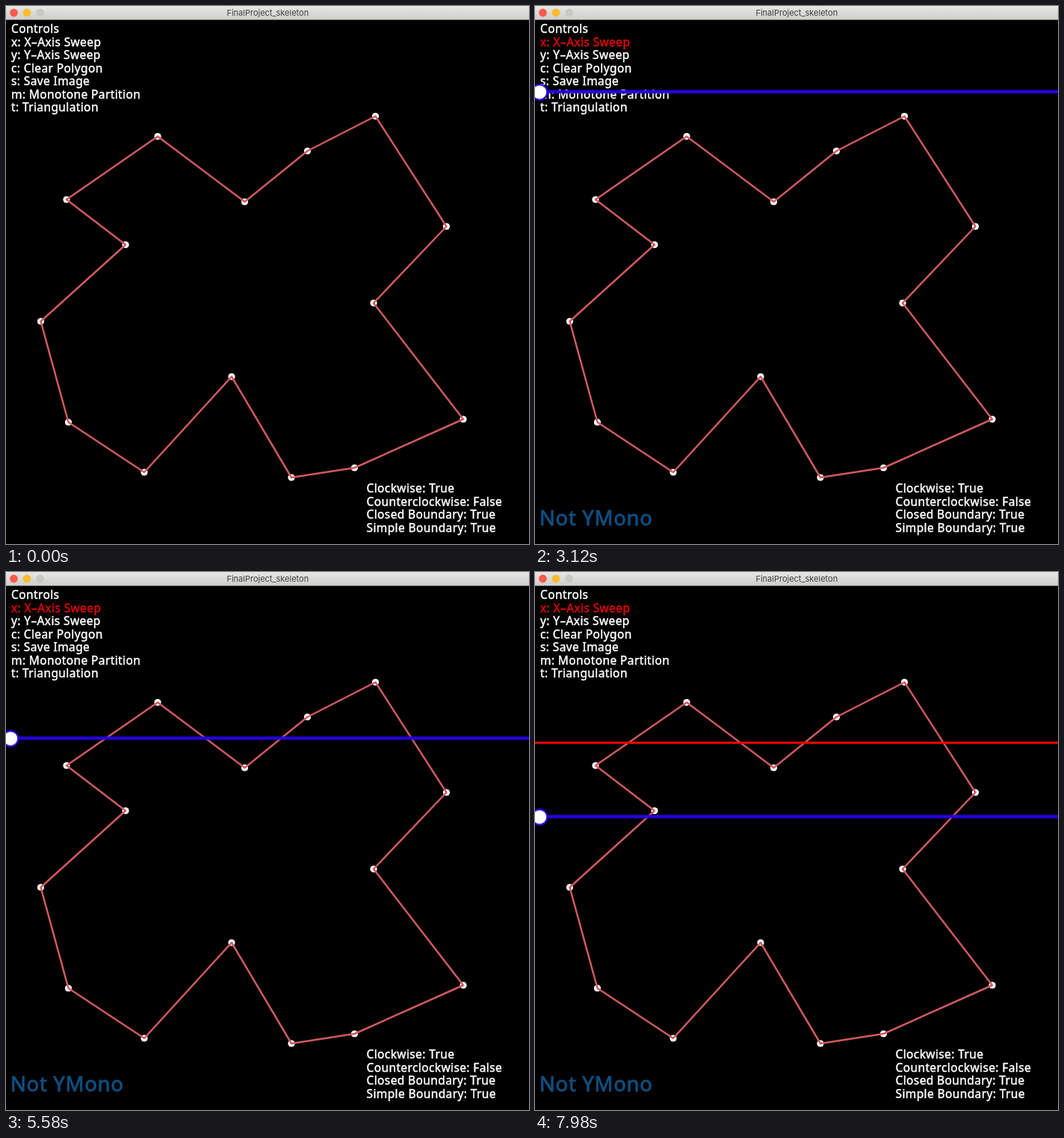
An HTML page for the animation above (8 s loop, 700x720 px).

```html
<!DOCTYPE html>
<html lang="en">
<head>
<meta charset="utf-8">
<title>Polygon sweep</title>
<style>
  html, body { margin: 0; width: 100%; height: 100%; overflow: hidden; background: #000; }
  svg { display: block; width: 700px; height: 720px; }
  text { white-space: pre; }
  .label, .verdict { font-family: "Noto Sans", "Open Sans", sans-serif; letter-spacing: .025em; stroke: currentColor; fill: currentColor; }
  .label { font-size: 15.5px; stroke-width: .45px; color: #fff; }
  .verdict { font-size: 27.5px; stroke-width: .8px; color: #0f4f80; }
  .title { font: 11px Inter, Roboto, sans-serif; fill: #404040; text-anchor: middle; }
  .outline { fill: none; stroke: #cf5a5e; stroke-width: 2.5; stroke-linejoin: round; paint-order: markers;
    marker-start: url(#vertex); marker-mid: url(#vertex); }

  .active { animation: activate 8s step-end infinite; }
  .started { animation: start 8s step-end infinite; }
  .violation { animation: violate 8s step-end infinite; }
  .sweep { animation: sweep 8s infinite; }

  @keyframes activate { 0% { color: #fff; } 11%, 100% { color: #e00606; } }
  @keyframes start { 0% { opacity: 0; } 11%, 100% { opacity: 1; } }
  @keyframes violate { 0% { opacity: 0; } 71.5%, 100% { opacity: 1; } }
  /* One 0.875px step every 20ms */
  @keyframes sweep {
    0% { transform: translateY(18.5px); animation-timing-function: step-end; }
    11.5% { transform: translateY(18.5px); animation-timing-function: steps(354, end); }
    100% { transform: translateY(328.25px); }
  }
</style>
</head>
<body>
<svg viewBox="0 0 700 720">
  <defs>
    <linearGradient id="bar" x2="0" y2="1">
      <stop stop-color="#e6e7e4"/>
      <stop offset="1" stop-color="#cdcfca"/>
    </linearGradient>
    <marker id="vertex" markerUnits="userSpaceOnUse" markerWidth="10" markerHeight="10" refX="5" refY="5">
      <circle cx="5" cy="5" r="4.6" fill="#fff"/>
    </marker>
    <clipPath id="canvas"><rect y="18" width="700" height="702"/></clipPath>
  </defs>

  <rect width="700" height="720"/>

  <g class="label">
    <text x="7" y="36">Controls</text>
    <text x="7" y="53.5" class="active">x: X–Axis Sweep</text>
    <text x="7" y="71">y: Y–Axis Sweep</text>
    <text x="7" y="88.7">c: Clear Polygon</text>
    <text x="7" y="106.2">s: Save Image</text>
    <text x="7" y="123.8">m: Monotone Partition</text>
    <text x="7" y="141.3">t: Triangulation</text>
    <text x="482.5" y="651">Clockwise: True</text>
    <text x="482.5" y="668.5">Counterclockwise: False</text>
    <text x="482.5" y="686">Closed Boundary: True</text>
    <text x="482.5" y="703.5">Simple Boundary: True</text>
  </g>
  <text x="6" y="694.5" class="verdict started">Not YMono</text>

  <polygon class="outline" points="203,174.5 319.5,262 403.5,194 494.5,147.5 589.5,295 492,397.5
    612,553 466.5,618 382,631 302,496 185,624 83.5,557 46.5,422 160,319.5 81,259"/>

  <path class="violation" d="M0 228.5H700" stroke="#e60606" stroke-width="3"/>

  <g clip-path="url(#canvas)">
    <g class="started">
      <g class="sweep">
        <path d="M0 0H700" stroke="#2404dc" stroke-width="4.4"/>
        <circle cx="6" cy=".6" r="10.3" fill="#fff" stroke="#2404dc" stroke-width="2.2"/>
      </g>
    </g>
  </g>

  <rect width="700" height="18.5" fill="url(#bar)"/>
  <circle cx="10.5" cy="9" r="5.4" fill="#fb5a4c"/>
  <circle cx="28" cy="9" r="5.4" fill="#fdbb2e"/>
  <circle cx="45.7" cy="9" r="5.4" fill="#c8c9c6"/>
  <text x="350.3" y="13" class="title">FinalProject_skeleton</text>
</svg>
</body>
</html>
```
